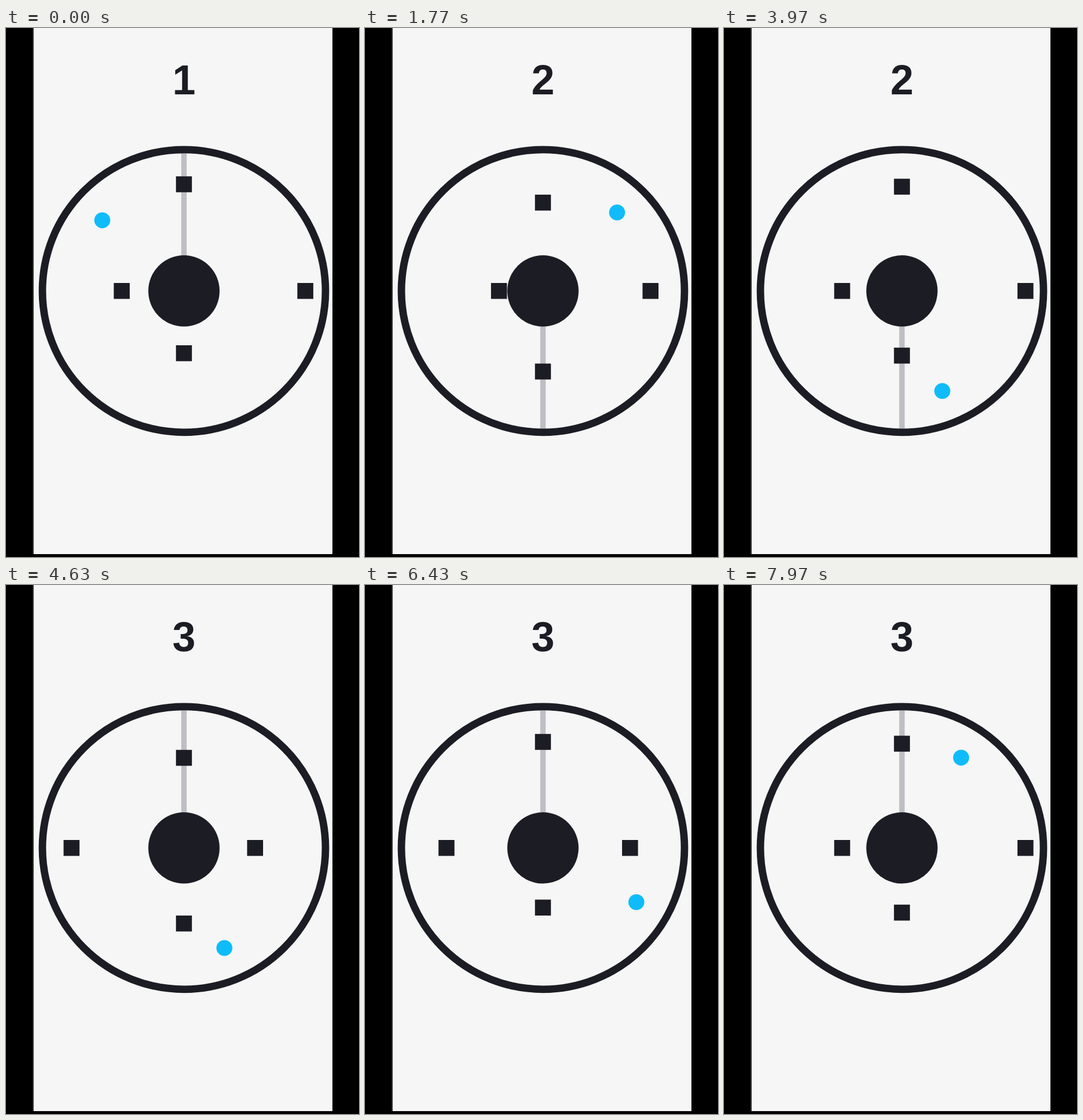
Write an HTML page that moves like this. It is 611 px wide and 917 px high and loops after 8000 ms.

```html
<!DOCTYPE html>
<html lang="en">
<head>
<meta charset="utf-8">
<title>Orbit game</title>
<style>
  html, body { margin: 0; width: 100%; height: 100%; overflow: hidden; background: #000; }
  svg { display: block; width: 100%; height: 100%; }
  .dark { fill: #1c1c24; }
  text { font: bold 72px "Liberation Sans", Arial, sans-serif; text-anchor: middle; }
</style>
</head>
<body>
<svg viewBox="0 0 611 917">
  <rect width="611" height="917" fill="#000"/>
  <rect x="46" width="2" height="912" fill="#3a3a3a"/>
  <rect x="48" width="517" height="912" fill="#f6f6f6"/>
  <text id="score" class="dark" x="308" y="114.7">1</text>
  <g transform="translate(308 455.8)">
    <rect id="goal" x="-4.7" y="-240" width="9.4" height="240" fill="#bfbec4"/>
    <circle r="245" fill="none" stroke="#1c1c24" stroke-width="12.8"/>
    <g id="blocks"></g>
    <circle class="dark" r="61.7"/>
    <circle id="ball" r="13.8" fill="#0fbcf9"/>
  </g>
</svg>
<script>
  const LOOP = 8000;
  const ORBIT = 187;
  const BLOCK = { size: 27.6, near: 76, far: 214, period: 2000 };

  // Direction of each block and its phase at the start.
  const blocks = [
    { dx: 0, dy: -1, phase: 0.3944 },
    { dx: 1, dy: 0, phase: 0.5142 },
    { dx: 0, dy: 1, phase: 0.8842 },
    { dx: -1, dy: 0, phase: 0.1146 }
  ];

  // Turning points of the ball: time in ms, degrees clockwise from the top.
  const turns = [
    [0, -49.1], [1579, 56], [2007, 27.6], [4300, 180],
    [5405, 106.4], [6021, 147.4], [7852, 25.4], [LOOP, 35.2]
  ];

  // Times at which the ball reaches the goal line.
  const hits = [680, 4240];

  const byId = id => document.getElementById(id);
  const score = byId("score"), goal = byId("goal"), ball = byId("ball");

  for (const block of blocks) {
    block.el = document.createElementNS("http://www.w3.org/2000/svg", "rect");
    block.el.setAttribute("class", "dark");
    block.el.setAttribute("width", BLOCK.size);
    block.el.setAttribute("height", BLOCK.size);
    byId("blocks").append(block.el);
  }

  function ballAngle(t) {
    const i = turns.findIndex(([end]) => end > t);
    const [t0, a0] = turns[i - 1], [t1, a1] = turns[i];
    return (a0 + (a1 - a0) * (t - t0) / (t1 - t0)) * Math.PI / 180;
  }

  function blockDistance(t, phase) {
    const p = (phase + t / BLOCK.period) % 1;
    return BLOCK.near + (BLOCK.far - BLOCK.near) * (1 - Math.abs(2 * p - 1));
  }

  function draw(t) {
    const points = hits.filter(hit => t >= hit).length;
    score.textContent = 1 + points;
    goal.setAttribute("transform", `rotate(${points % 2 * 180})`);

    for (const { el, dx, dy, phase } of blocks) {
      const d = blockDistance(t, phase);
      el.setAttribute("x", dx * d - BLOCK.size / 2);
      el.setAttribute("y", dy * d - BLOCK.size / 2);
    }

    const angle = ballAngle(t);
    ball.setAttribute("cx", ORBIT * Math.sin(angle));
    ball.setAttribute("cy", -ORBIT * Math.cos(angle));
  }

  let start;
  function tick(now) {
    start ??= now;
    draw(Math.max(0, now - start) % LOOP);
    requestAnimationFrame(tick);
  }
  draw(0);
  requestAnimationFrame(tick);
</script>
</body>
</html>
```
